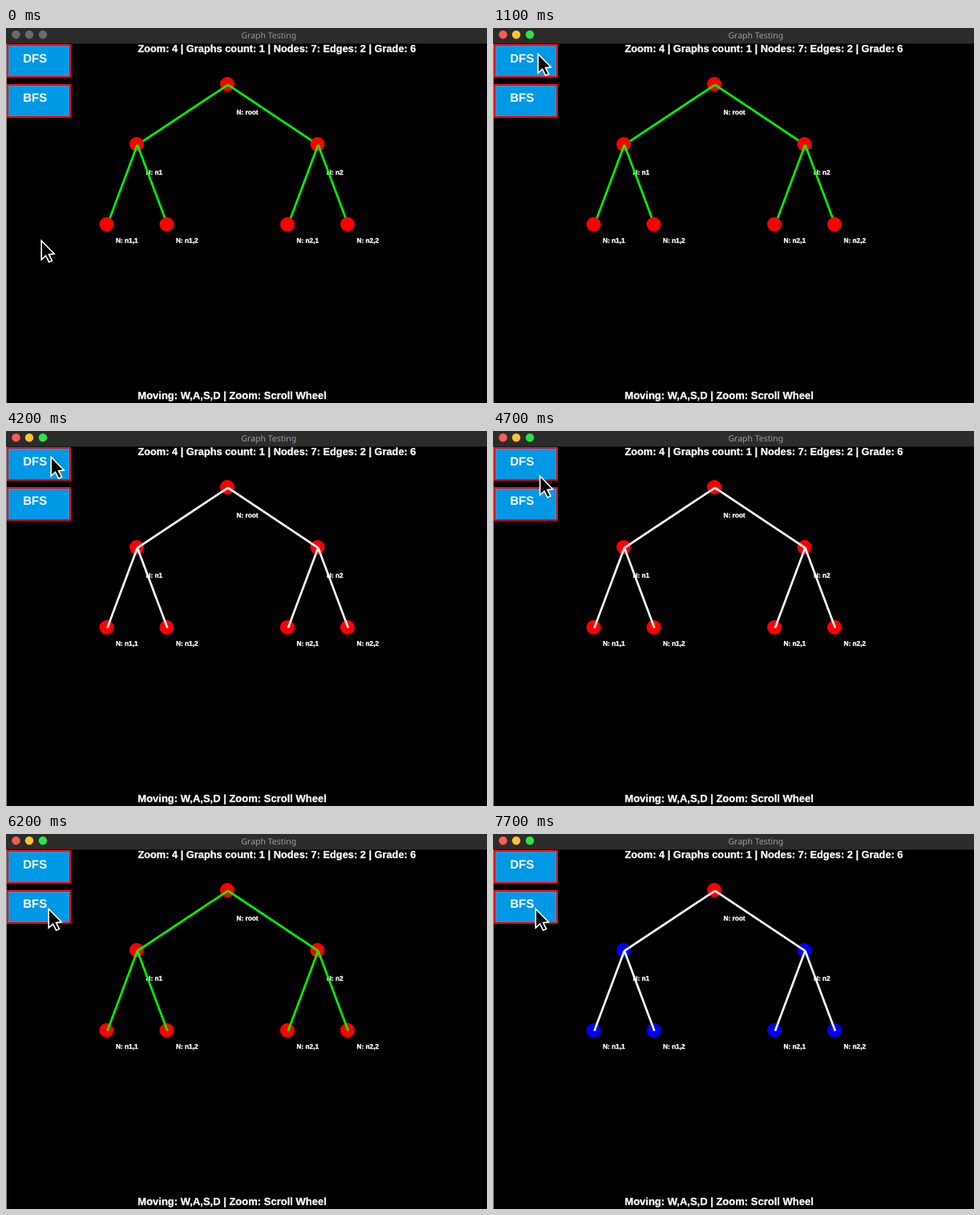
Animation, 600 px wide and 468 px high, one loop 8000 ms. Source, as an HTML page:

```html
<!DOCTYPE html>
<html lang="en">
<head>
<meta charset="utf-8">
<title>Graph Testing</title>
<style>
  html, body { margin: 0; width: 100%; height: 100%; overflow: hidden; background: #000; }
  svg { display: block; width: 600px; height: 468px; }
  text { font-family: "Liberation Sans", Arial, sans-serif; font-weight: bold; fill: #fff; text-rendering: geometricPrecision; }
  .title { font: 10.5px "Noto Sans", sans-serif; text-anchor: middle; }
  .button rect { fill: #0099e5; stroke: #f00; stroke-width: 2; }
  .button text { font-size: 15px; }
  .info { stroke: #fff; stroke-width: .3; }
  .label { font-size: 8.3px; stroke: #fff; stroke-width: .35; }
  .edge { stroke-width: 2.6; }
</style>
</head>
<body>
<svg viewBox="0 0 600 468">
  <rect width="600" height="468"/>
  <rect y="19" width="1" height="449" fill="#8a8a8a"/>
  <rect width="600" height="19.5" fill="#2c2c2a"/>
  <g id="lights">
    <circle cx="12.5" cy="8.3" r="5.2"/>
    <circle cx="29" cy="8.3" r="5.2"/>
    <circle cx="46" cy="8.3" r="5.2"/>
  </g>
  <text id="title" class="title" x="327.8" y="12.5">Graph Testing</text>

  <g class="button">
    <rect x="2" y="21" width="78" height="40"/>
    <text x="21.2" y="42.6">DFS</text>
  </g>
  <g class="button">
    <rect x="2" y="71" width="78" height="40"/>
    <text x="21.2" y="92.2">BFS</text>
  </g>

  <text class="info" x="164.4" y="30.3" font-size="12.8">Zoom: 4 | Graphs count: 1 | Nodes: 7: Edges: 2 | Grade: 6</text>
  <text class="info" x="164.3" y="462.8" font-size="13">Moving: W,A,S,D | Zoom: Scroll Wheel</text>

  <g id="labels"></g>
  <g id="tree"></g>
  <g id="overlay"></g>
  <path id="cursor" d="M.2 .4V24.2L5.6 19.2L9.6 27.2L13.5 25.4L9.5 17.6L16.2 16.8Z"
        fill="#000" stroke="#fff" stroke-width="1.6"/>
</svg>
<script>
const LOOP = 8000, STEP = 100, RESET = 6200;
const LIGHTS = [[255, 92, 84], [254, 196, 46], [44, 228, 68]];
const GREY = [107, 107, 105];

// dfs and bfs: when each search reaches the node
const nodes = [
  { name: "root", x: 276, y: 70 },
  { name: "n1", x: 163, y: 145, parent: 0, dfs: 3200, bfs: 6500 },
  { name: "n2", x: 388.5, y: 145, parent: 0, dfs: 3700, bfs: 6700 },
  { name: "n1,1", x: 125.5, y: 245, parent: 1, dfs: 3400, bfs: 7000 },
  { name: "n1,2", x: 200.5, y: 245, parent: 1, dfs: 3700, bfs: 7200 },
  { name: "n2,1", x: 351, y: 245, parent: 2, dfs: 4000, bfs: 7500 },
  { name: "n2,2", x: 426, y: 245, parent: 2, dfs: 4200, bfs: 7700 }
];

const moves = [
  { start: 100, steps: 6, from: [44, 265], bend: [204, 150], to: [56, 32] },
  { start: 4500, steps: 7, from: [56, 32], bend: [62, 62], to: [53, 93] }
];

const $ = id => document.getElementById(id);

function add(parent, tag, attrs, text = "") {
  const el = document.createElementNS("http://www.w3.org/2000/svg", tag);
  for (const key in attrs) el.setAttribute(key, attrs[key]);
  el.textContent = text;
  return parent.appendChild(el);
}

function addEdge(layer, a, b) {
  return add(layer, "line", { class: "edge", x1: a.x + .9, y1: a.y + .8, x2: b.x + .9, y2: b.y + .8 });
}

// Each edge lies under its child's dot, with a second copy above all dots.
for (const n of nodes) {
  const parent = nodes[n.parent];
  const drop = n.parent ? 23.4 : 38.4;
  add($("labels"), "text", { class: "label", x: n.x + 11.4, y: n.y + drop }, "N: " + n.name);
  if (parent) n.under = addEdge($("tree"), parent, n);
  n.dot = add($("tree"), "circle", { cx: n.x, cy: n.y, r: 9, fill: "#f00" });
  if (parent) n.over = addEdge($("overlay"), parent, n);
}

const mix = (a, b, p) => `rgb(${a.map((v, i) => v + (b[i] - v) * p)})`;

function cursorAt(t) {
  const move = t < moves[1].start ? moves[0] : moves[1];
  const done = Math.floor((t - move.start) / STEP) + 1;
  const p = Math.min(1, Math.max(0, done / move.steps));
  const e = p * p * (3 - 2 * p), q = 1 - e;
  return move.from.map((v, i) => q * q * v + 2 * q * e * move.bend[i] + e * e * move.to[i]);
}

function draw(t) {
  const focus = t < 1000 ? 0 : t < 1100 ? .6 : 1;
  LIGHTS.forEach((c, i) => $("lights").children[i].style.fill = mix(GREY, c, focus));
  $("title").style.fill = mix([144, 148, 152], [146, 160, 174], focus);

  const second = t >= RESET;
  for (const n of nodes) {
    if (!n.over) continue;
    const reached = t >= (second ? n.bfs : n.dfs);
    n.under.style.stroke = n.over.style.stroke = reached ? "#fff" : "#0f0";
    n.over.style.visibility = reached || second ? "visible" : "hidden";
    n.under.style.visibility = reached || second ? "hidden" : "visible";
    n.dot.style.fill = second && reached ? "#00f" : "#f00";
  }
  $("cursor").setAttribute("transform", `translate(${cursorAt(t)})`);
}

function tick() {
  draw(performance.now() % LOOP);
  requestAnimationFrame(tick);
}
tick();
</script>
</body>
</html>
```
